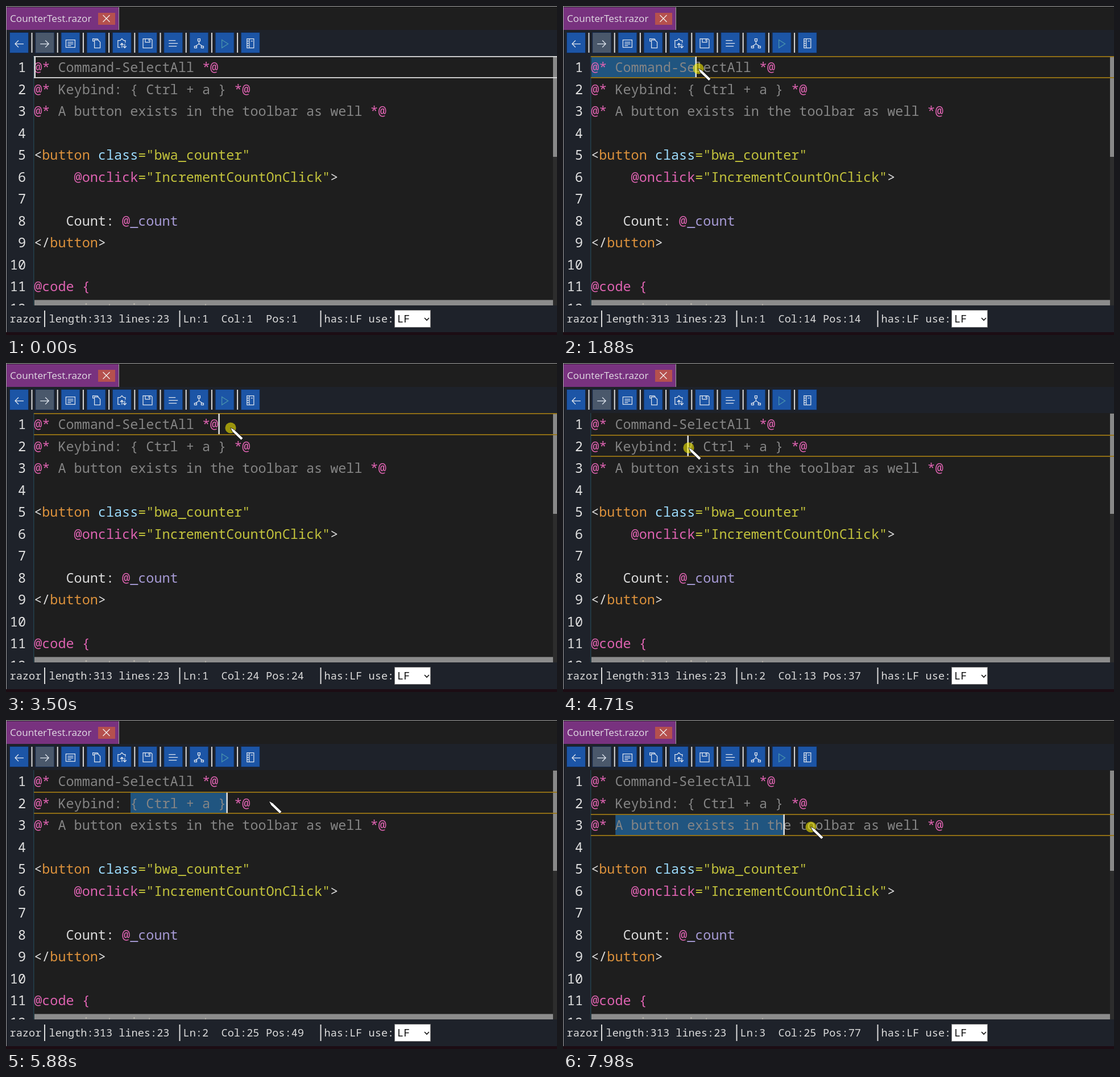
Recreate the animation shown at these times as an HTML page with a canvas. Size 969 by 578 pixels, loop 8000 ms.

```html
<!DOCTYPE html>
<html lang="en">
<head>
<meta charset="utf-8">
<title>Editor selection</title>
<style>
  html, body { margin: 0; width: 100%; height: 100%; overflow: hidden; background: #1e1e1e; }
  canvas { display: block; }
</style>
</head>
<body>
<canvas id="stage" width="969" height="578"></canvas>
<script>
const ctx = document.getElementById('stage').getContext('2d');
const LOOP = 8000, STEP = 67.6, START = 108;
const LEFT = 50, TOP = 88, ROW = 38.5, CHAR = 14.08;
const TEXT_LEFT = LEFT - 0.8;
const MONO = '"Noto Sans Mono", "DejaVu Sans Mono", monospace';
const CODE_FONT = '23.47px ' + MONO;
const STATUS_FONT = '18.6px ' + MONO;

const C = {
  text: '#dcdcdc', note: '#858585', pink: '#de63b1', tag: '#dd923c',
  attr: '#9cdcfe', str: '#c3c33c', field: '#a79bd6',
  panel: '#1e222a', editor: '#1e1e1e', select: '#205580', gold: '#9a7614',
  rim: '#a0a0a0'
};

const note = s => [['@*', C.pink], [s, C.note], ['*@', C.pink]];
const lines = [
  note(' Command-SelectAll '),
  note(' Keybind: { Ctrl + a } '),
  note(' A button exists in the toolbar as well '),
  [],
  [['<', C.text], ['button', C.tag], [' class', C.attr], ['="bwa_counter"', C.str]],
  [['     @onclick', C.pink], ['="IncrementCountOnClick"', C.str], ['>', C.text]],
  [],
  [['    Count: ', C.text], ['@', C.pink], ['_count', C.field]],
  [['</', C.text], ['button', C.tag], ['>', C.text]],
  [],
  [['@code {', C.pink]]
];
const lengthOf = row => lines[row].reduce((n, run) => n + run[0].length, 0);

// Pointer tip: step, x, y
const path = [
  [0, 667, 440], [4, 400, 290], [8, 130, 160], [11, 43, 112], [13, 39, 108],
  [15, 39, 108], [16, 42, 108], [24, 222, 110], [25, 233, 110], [26, 238, 110],
  [27, 250, 111], [35, 370, 115], [36, 378, 115], [38, 378, 115], [41, 395, 114],
  [54, 395, 114], [60, 310, 130], [66, 224, 151], [67, 222, 149], [68, 221, 149],
  [78, 379, 149], [79, 392, 149], [85, 463, 143], [92, 463, 143], [96, 330, 160],
  [101, 125, 197], [103, 118, 199], [107, 92, 188], [108, 92, 188], [109, 95, 187],
  [113, 158, 186], [114, 270, 187], [115, 389, 188], [116, 436, 188]
];

// Mouse button presses, by step
const presses = [
  { from: 15, to: 38, row: 0 }, { from: 50, to: 52, row: 0 },
  { from: 67, to: 80, row: 1 }, { from: 90, to: 92, row: 1 },
  { from: 108, to: 999, row: 2 }
];

function tipAt(k) {
  let i = 0;
  while (i < path.length - 2 && k > path[i + 1][0]) i++;
  const [a, x0, y0] = path[i], [b, x1, y1] = path[i + 1];
  const u = Math.max(0, Math.min(1, (k - a) / (b - a)));
  return [x0 + (x1 - x0) * u, y0 + (y1 - y0) * u];
}

function colAt(k, row) {
  const col = Math.round((tipAt(k)[0] - LEFT) / CHAR);
  return Math.max(0, Math.min(lengthOf(row), col));
}

function stateAt(k) {
  const press = presses.filter(p => p.from <= k).pop();
  if (!press) return { row: 0, anchor: 0, col: 0, down: false, fresh: true };
  const { from, to, row } = press;
  // the caret trails the pointer by one step
  return {
    row, anchor: colAt(from, row),
    col: colAt(Math.max(from, Math.min(k, to) - 1), row),
    down: k < to, fresh: false
  };
}

function box(x, y, w, h, color) {
  ctx.fillStyle = color;
  ctx.fillRect(x, y, w, h);
}

function text(s, x, y, color, font) {
  ctx.font = font;
  ctx.fillStyle = color;
  ctx.fillText(s, x, y);
}

function stroke(d, x, y, color, width) {
  ctx.save();
  ctx.translate(x, y);
  ctx.strokeStyle = color;
  ctx.lineWidth = width;
  ctx.stroke(new Path2D(d));
  ctx.restore();
}

const icons = [
  'M8 1H-7M-1-5L-7 1L-1 7',
  'M-8 1H7M1-5L7 1L1 7',
  'M-8-6H8V7H-8ZM-5-2H5M-5 1H5M-5 4H1',
  'M-3-6H3L7-2V8H-3ZM-3-4H-6V-8H2L4-6',
  'M-3 7H-7V-5H-3M3-5H6V-1M-3-5L0-8L3-5M0 8V0M-3 3L0 0L3 3M5 1V8M2 5L5 8L8 5',
  'M-8-8H6L8-6V8H-8ZM-4-8V-2H4V-8M2-7V-4',
  'M-8-5H4M-8 0H8M-8 5H6',
  'M-2-8H2V-4H-2ZM0-4V1L-6 5M0 1L6 5M-8 5H-4V8H-8ZM4 5H8V8H4Z',
  'M-5-6L6 1L-5 8Z',
  'M-6-8H6V8H-6ZM-2-8V8M-6-4H-3M-6 0H-3M-6 4H-3M1-4H4'
];

function drawHeader() {
  box(0, 0, 969, 43, C.editor);
  box(1, 2, 198, 40, '#78327f');
  box(198, 2, 1, 40, C.rim);
  text('CounterTest.razor', 7, 28, '#e2dce4', '17.2px "Open Sans", "Noto Sans", sans-serif');
  box(162, 12, 30, 21, '#b5504e');
  stroke('M-6-6L6 6M6-6L-6 6', 176.5, 22, '#f0e8e8', 1.4);

  box(0, 42, 969, 46, C.panel);
  icons.forEach((d, i) => {
    const x = 6 + i * 45.2;
    box(x, 46, 34, 37, '#14284a');
    box(x + 1, 47, 32, 35, i === 1 ? '#4a586b' : '#1c55a6');
    stroke(d, x + 17, 65.5, i === 8 ? '#4a94ad' : '#dfe5ee', 1.25);
    if (i < 9) box(x + 38.5, 47, 2, 35, '#dcdcdc');
  });
}

function drawCode(s, k) {
  box(0, 88, 969, 439, C.editor);
  box(0, 88, 48, 439, C.panel);
  box(48, 88, 1.5, 439, '#24404c');
  box(962, 88, 7, 438, '#2d2d2d');
  box(962, 89, 7, 176, '#888');

  const y = TOP + s.row * ROW;
  const edge = s.fresh ? '#dcdcdc' : C.gold;
  if (s.col !== s.anchor) {
    const a = Math.min(s.anchor, s.col), b = Math.max(s.anchor, s.col);
    box(LEFT + a * CHAR, y + 1.5, (b - a) * CHAR, 35.5, C.select);
  }
  box(49, Math.floor(y), 920, 1.8, edge);
  box(49, Math.floor(y + 37), 920, 1.8, edge);

  lines.forEach((runs, row) => {
    const base = 116 + row * ROW, num = String(row + 1);
    text(num, 35 - num.length * CHAR, base, '#e2e2e2', CODE_FONT);
    let col = 0;
    for (const [str, color] of runs) {
      text(str, TEXT_LEFT + col * CHAR, base, color, CODE_FONT);
      col += str.length;
    }
  });

  // twelfth row peeks out behind the scrollbar
  box(50, 516.5, 912, 9.5, '#8c8c8c');
  ctx.save();
  ctx.beginPath();
  ctx.rect(0, 516, 962, 10);
  ctx.clip();
  text('12', 35 - 2 * CHAR, 116 + 11 * ROW, C.text, CODE_FONT);
  text('    private int _count;', TEXT_LEFT, 116 + 11 * ROW, '#b3afa6', CODE_FONT);
  ctx.restore();

  const hidden = (k >= 8 && k < 15) || (k >= 65 && k < 67);
  if (!hidden) box(LEFT - 0.5 + s.col * CHAR, y + 1, 2.5, 36, '#e4e4e4');
}

function drawStatus(s) {
  box(0, 526, 969, 47, C.panel);
  box(0, 573, 969, 5, '#1c0d14');
  const pos = s.col + 1 + [0, 24, 52][s.row];
  const put = (str, x) => text(str, x, 556, C.text, STATUS_FONT);
  put('razor', 6.5);
  put('length:313 lines:23', 75.5);
  put('Ln:' + (s.row + 1), 311.5);
  put('Col:' + (s.col + 1), 378.5);
  put('Pos:' + pos, 457);
  put('has:LF use:', 559.5);
  for (const x of [67, 304.5, 552.5]) box(x, 535, 2, 29, '#dcdcdc');
  box(683, 534, 64, 31, '#767676');
  box(684, 535, 62, 29, '#fff');
  text('LF', 688, 556, '#111', STATUS_FONT);
  stroke('M-4-2L0 2L4-2', 740, 550, '#111', 1.6);
}

function drawPointer(k, down) {
  if (k < 0) return;
  const [x, y] = tipAt(k);
  if (down) {
    ctx.fillStyle = 'rgba(255, 245, 0, .56)';
    ctx.beginPath();
    ctx.arc(x, y, 9.6, 0, Math.PI * 2);
    ctx.fill();
  }
  ctx.save();
  ctx.translate(x, y);
  const pen = new Path2D('M0 0L6 3.2L21.5 18L18.5 21L3.4 6.6Z');
  ctx.lineJoin = 'round';
  ctx.lineWidth = 1.4;
  ctx.strokeStyle = '#111';
  ctx.stroke(pen);
  ctx.fillStyle = '#fff';
  ctx.fill(pen);
  ctx.restore();
}

function draw(now) {
  const k = Math.floor((now % LOOP - START) / STEP);
  const s = stateAt(k);
  drawHeader();
  drawCode(s, k);
  drawStatus(s);
  box(0, 0, 969, 1, C.rim);
  box(0, 0, 1, 573, C.rim);
  drawPointer(k, s.down);
}

const begin = performance.now();
function tick() {
  draw(performance.now() - begin);
  requestAnimationFrame(tick);
}
tick();
</script>
</body>
</html>
```
